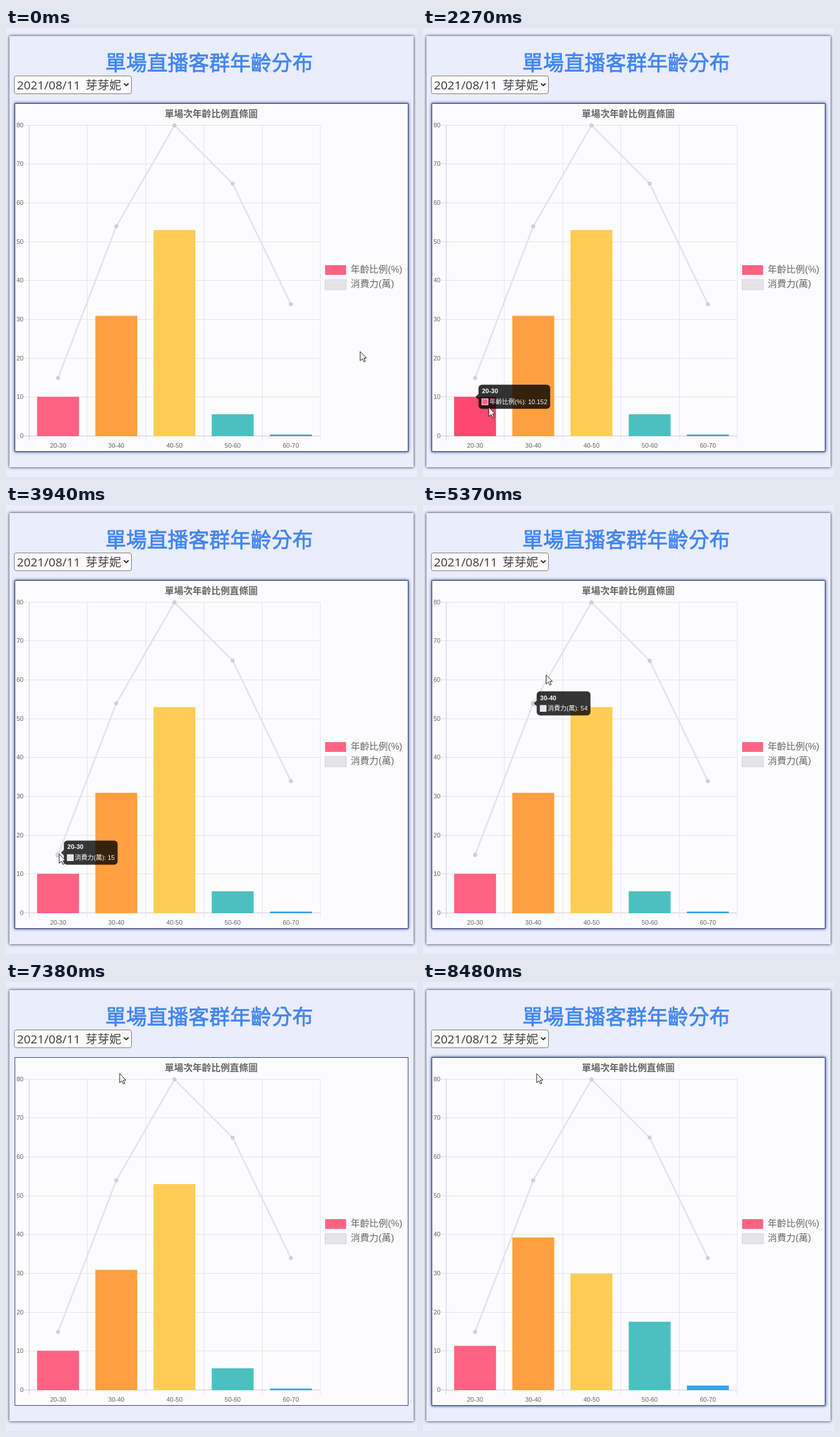
An HTML page for the animation above (8.53 s loop, 716 by 782 pixels).

```html
<!DOCTYPE html>
<html lang="zh-Hant">
<head>
<meta charset="utf-8">
<title>年齡分布</title>
<style>
  html, body { margin: 0; width: 100%; height: 100%; overflow: hidden; background: #e9edfc; }
  div, svg { position: absolute; box-sizing: border-box; }
  svg { left: 0; top: 0; width: 716px; height: 782px; }
  text { font-family: "Liberation Sans", "Noto Sans CJK TC", "Noto Sans CJK", sans-serif; fill: #666; }
  #card { left: 6px; top: 14px; width: 704px; height: 751px; box-shadow: 0 0 5px #1c1c30; background: #e9edfc; }
  #chart { left: 15px; top: 131px; width: 686px; height: 607px; border: 1px solid #26376f; background: #fcfcfe; }
  #chart.hover { box-shadow: 0 0 5px #14245f; }
  #select { left: 14px; top: 83px; width: 205px; height: 32px; border: 1px solid #767676; border-radius: 4px; background: #fcfcfe; }
  .heading { font: 36.2px "Noto Sans CJK TC", "Noto Sans CJK", sans-serif; fill: #4285f4; stroke: #4285f4; stroke-width: .8; }
  .option { font: 300 20.8px "Noto Sans CJK TC", "Noto Sans CJK", sans-serif; fill: #444; }
  #date { font: 300 20.8px "Noto Sans", sans-serif; }
  .tick { font-size: 11px; }
  .legend { font-size: 16.2px; }
  #tip text { font-size: 11px; fill: #fff; }
</style>
</head>
<body>
<div id="card"></div>
<div id="select"></div>
<div id="chart"></div>
<svg viewBox="0 0 716 782">
  <text class="heading" x="354" y="73.5" text-anchor="middle">單場直播客群年齡分布</text>
  <text class="option" id="date" x="19" y="106.5"></text>
  <text class="option" x="138.5" y="106.5">芽芽妮</text>
  <path d="M205.5 96.5l4 4 4-4" fill="none" stroke="#222" stroke-width="1.8"/>
  <text x="357.5" y="154.5" text-anchor="middle" font-size="16.2" font-weight="bold">單場次年齡比例直條圖</text>
  <g id="grid"></g>
  <g id="line"></g>
  <g id="bars"></g>
  <rect x="556" y="413" width="36.500" height="17" fill="#ff6384"/>
  <rect x="556" y="438.500" width="36.500" height="17" fill="#e5e5e9" stroke="#dcdce2" stroke-width="2"/>
  <text class="legend" x="600.5" y="425.5">年齡比例(%)</text>
  <text class="legend" x="600.5" y="451">消費力(萬)</text>
  <g id="tip">
    <path id="caret" fill="#000" fill-opacity=".8"/>
    <rect id="box" height="42" rx="6" fill="#000" fill-opacity=".8"/>
    <text id="tipTitle" x="6" y="15" font-weight="bold"></text>
    <rect id="swatch" x="6" y="24.500" width="10.500" height="10.500" stroke="#fff"/>
    <text id="tipBody" x="19" y="33.5"></text>
  </g>
  <path id="cursor" d="M0 .5V16.500L4 13 6.500 18.500 9 17.500 6.500 12H11Z" fill="#fff" stroke="#111"/>
</svg>
<script>
const LOOP = 8530, SWITCH = 8060, LAG = 30;
const ages = ['20-30', '30-40', '40-50', '50-60', '60-70'];
const before = [10.152, 30.986, 53.052, 5.652, 0.43];
const after = [11.58, 40.36, 27.06, 19.14, 1.3];
const spend = [15, 54, 80, 65, 34];
const colors = ['#ff6384', '#ff9f40', '#ffcd56', '#4bc0c0', '#36a2eb'];

const $ = id => document.getElementById(id);
const set = (el, attrs) => { for (const k in attrs) el.setAttribute(k, attrs[k]); };
const add = (parent, tag, attrs, text) => {
  const el = document.createElementNS('http://www.w3.org/2000/svg', tag);
  set(el, attrs);
  if (text !== undefined) el.textContent = text;
  return parent.appendChild(el);
};
const mix = (a, b, p) => a + (b - a) * p;
const easeOut = p => 1 - (1 - Math.min(1, Math.max(0, p))) ** 4;
const xOf = i => 90.7 + i * 101.4;
const yOf = v => 711 - v * 6.768;

// A highlighted colour keeps its strongest channel and lowers the others.
function highlight(hex, amount) {
  const rgb = [1, 3, 5].map(k => parseInt(hex.slice(k, k + 2), 16));
  const max = Math.max(...rgb);
  return `rgb(${rgb.map(c => Math.round(max - (max - c) * (1 + 0.17 * amount)))})`;
}

for (let v = 0; v <= 80; v += 10) {
  const y = Math.round(yOf(v)) - 0.5;
  add($('grid'), 'path', { d: `M31 ${y}H547.5`, stroke: v ? '#e3e3e5' : '#cacad3' });
  add($('grid'), 'text', { class: 'tick', x: 30.5, y: y + 3.5, 'text-anchor': 'end' }, v);
}
for (let i = 0; i <= 5; i++) {
  const x = Math.round(40 + i * 101.4) + 0.5;
  add($('grid'), 'path', { d: `M${x} 169V719`, stroke: i ? '#e3e3e5' : '#cacad3' });
}
ages.forEach((age, i) =>
  add($('grid'), 'text', { class: 'tick', x: xOf(i), y: 730.5, 'text-anchor': 'middle' }, age));

add($('line'), 'polyline', {
  points: spend.map((v, i) => [xOf(i), yOf(v)]).join(' '),
  fill: 'none', stroke: '#e3e3ea', 'stroke-width': 2.8
});
const dots = spend.map((v, i) =>
  add($('line'), 'circle', { cx: xOf(i), cy: yOf(v), r: 3, fill: '#d2d2d7', stroke: '#c6c6cc' }));
const bars = before.map((v, i) => add($('bars'), 'rect', { x: xOf(i) - 36.5, width: 73 }));

// The pointer goes in straight moves from stop to stop.
const route = [];
const go = (t, [x, y], rest = 0) => {
  route.push({ t, x, y });
  if (rest) route.push({ t: t + rest, x, y });
};
const inBar = i => [xOf(i), yOf(before[i] / 2)];
const onDot = i => [xOf(i) + 2, yOf(spend[i]) - 2];

go(0, [617, 563], 130);
go(1200, [190, 590]);
go(1470, [137, 596]);
go(1750, inBar(0), 450);
go(2500, inBar(1), 270);
go(2850, [264, 530]);
go(2980, [277, 522]);
for (const i of [3, 4]) go(2650 + i * 160, inBar(i), 50);
go(3450, inBar(1), 150);
go(3690, onDot(0), 760);
go(4800, onDot(1), 535);
go(5370, [214, 296]);
for (const i of [2, 3, 4]) go(4750 + i * 400, onDot(i), 250);
go(7000, [204, 104], 120);
go(7280, [198, 159], LOOP - 7280);

function pointer(t) {
  const k = Math.max(1, route.findIndex(stop => stop.t >= t));
  const [a, b] = [route[k - 1], route[k]];
  const p = (t - a.t) / (b.t - a.t);
  return [mix(a.x, b.x, p), mix(a.y, b.y, p)];
}

// Items 0-4 are bars, 5-9 are line points, -1 is none.
function hit(t) {
  const [x, y] = pointer(t);
  const dot = spend.findIndex((v, i) => Math.hypot(x - xOf(i), y - yOf(v)) < 8);
  if (dot >= 0) return 5 + dot;
  return before.findIndex((v, i) => Math.abs(x - xOf(i)) < 36.5 && y > yOf(v) && y < 711);
}

const pen = document.createElement('canvas').getContext('2d');
pen.font = '11px "Liberation Sans", "Noto Sans CJK TC", "Noto Sans CJK", sans-serif';

function layout(item) {
  const i = item % 5, isBar = item < 5;
  const value = isBar ? before[i] : spend[i];
  const body = `${isBar ? '年齡比例(%)' : '消費力(萬)'}: ${value}`;
  const w = pen.measureText(body).width + 24;
  const px = xOf(i), py = yOf(value);
  let x = px - w / 2, y = py - 21, caret;
  if (py < 173) { y = py + 6; caret = `M${w / 2 - 5} 0l5-5 5 5z`; }
  else if (py > 695) { y = py - 48; caret = `M${w / 2 - 5} 42l5 5 5-5z`; }
  else if (i < 3) { x = px + 6; caret = 'M0 16l-5 5 5 5z'; }
  else { x = px - 6 - w; caret = `M${w} 16l5 5-5 5z`; }
  return { title: ages[i], body, w, x, y, caret, color: isBar ? colors[i] : '#e5e5e9' };
}

// State vector: tooltip x, y, opacity, then ten highlight amounts.
const idle = Array(13).fill(0);
const events = [{ t: -1000, from: idle, to: idle, tip: null }];
const stateIn = (e, t) => {
  const p = easeOut((t - e.t) / 400);
  return e.from.map((v, k) => mix(v, e.to[k], p));
};
let active = -1;
for (let t = 0; t < LOOP; t += 4) {
  const item = hit(t);
  if (item === active) continue;
  active = item;
  const last = events[events.length - 1];
  const from = stateIn(last, t + LAG);
  const tip = item < 0 ? last.tip : layout(item);
  if (!last.tip) [from[0], from[1]] = [tip.x, tip.y];
  const lit = Array.from({ length: 10 }, (_, k) => +(k === item));
  events.push({ t: t + LAG, from, to: [tip.x, tip.y, +(item >= 0), ...lit], tip });
}

function draw(t) {
  const [cx, cy] = pointer(t);
  set($('cursor'), { transform: `translate(${cx} ${cy})` });
  const popupOpen = t > 7000 && t < SWITCH;
  $('chart').classList.toggle('hover', cy > 131 && !popupOpen);
  $('date').textContent = t < SWITCH ? '2021/08/11' : '2021/08/12';

  const event = events.filter(e => e.t <= t).pop();
  const [x, y, opacity, ...lit] = stateIn(event, t);
  const change = easeOut((t - SWITCH) / 1000);
  bars.forEach((bar, i) => {
    const top = yOf(mix(before[i], after[i], change));
    set(bar, { y: top, height: 711 - top, fill: highlight(colors[i], lit[i]) });
    set(dots[i], { r: 3 + lit[5 + i] });
  });

  set($('tip'), { opacity: event.tip ? opacity : 0, transform: `translate(${x} ${y})` });
  if (!event.tip) return;
  const { title, body, w, caret, color } = event.tip;
  $('tipTitle').textContent = title;
  $('tipBody').textContent = body;
  set($('box'), { width: w });
  set($('caret'), { d: caret });
  set($('swatch'), { fill: color });
}

const start = performance.now();
function frame() {
  draw((performance.now() - start) % LOOP);
  requestAnimationFrame(frame);
}
frame();
</script>
</body>
</html>
```
